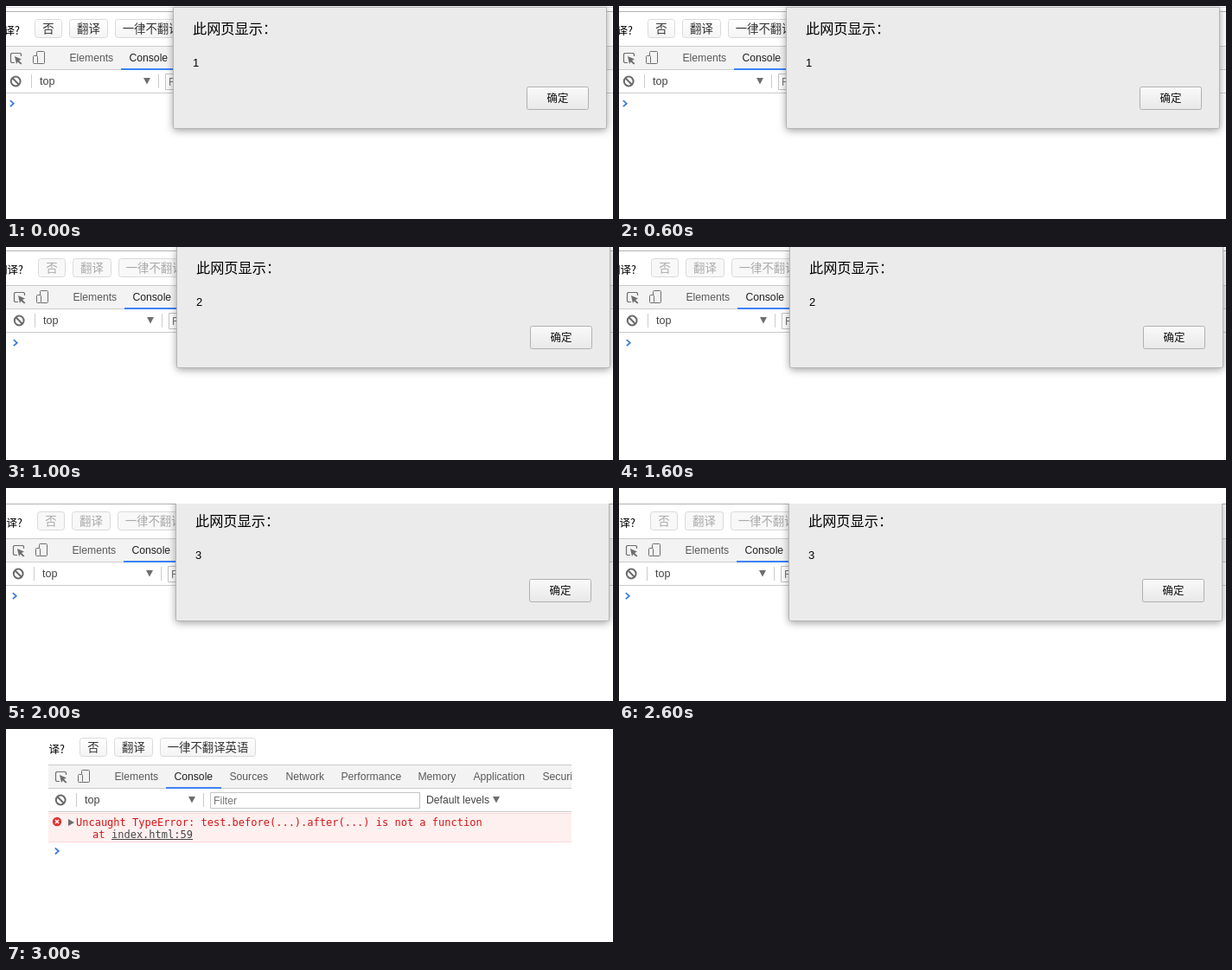
Write an HTML page with a canvas that moves like this. It is 702 px wide and 246 px high and loops after 4000 ms.

```html
<!DOCTYPE html>
<html lang="zh-CN">
<head>
<meta charset="utf-8">
<title>Alert loop</title>
<style>
  html, body { margin: 0; width: 100%; height: 100%; overflow: hidden; background: #fff; }
  canvas { display: block; }
</style>
</head>
<body>
<canvas id="stage" width="702" height="246"></canvas>
<script>
const ctx = document.getElementById('stage').getContext('2d');
const SANS = '"Liberation Sans", Arial, sans-serif';
const CJK = '"Noto Sans CJK SC", "Noto Sans CJK", sans-serif';
const MONO = '"DejaVu Sans Mono", monospace';
const W = 702, H = 246, STEP = 1000;

// Each scene shifts the same page and shows it through a clip box.
const scenes = [
  { dx: 0, dy: 0, clip: [0, 0, W, H], count: 1 },
  { dx: 4, dy: -2, clip: [0, 0, W, H], count: 2, dim: true },
  { dx: 3, dy: 12, clip: [0, 18, W, H - 18], count: 3, dim: true },
  { dx: 52, dy: -5, clip: [49, 5, 605, H - 5], error: true }
];

function fill(color, x, y, w, h) {
  ctx.fillStyle = color;
  ctx.fillRect(x, y, w, h);
}

function text(str, x, y, size, color, family = SANS, align = 'left') {
  ctx.font = `${size}px ${family}`;
  ctx.textAlign = align;
  ctx.fillStyle = color;
  ctx.fillText(str, x, y);
}

function line(points, color, width = 1) {
  ctx.beginPath();
  points.forEach(([x, y]) => ctx.lineTo(x, y));
  ctx.strokeStyle = color;
  ctx.lineWidth = width;
  ctx.stroke();
}

function shape(points, color) {
  ctx.beginPath();
  points.forEach(([x, y]) => ctx.lineTo(x, y));
  ctx.fillStyle = color;
  ctx.fill();
}

function box(x, y, w, h, r, paint, border) {
  ctx.beginPath();
  ctx.roundRect(x + 0.5, y + 0.5, w - 1, h - 1, r);
  ctx.fillStyle = paint;
  ctx.fill();
  ctx.strokeStyle = border;
  ctx.lineWidth = 1;
  ctx.stroke();
}

function shade(y, h, top, bottom) {
  const g = ctx.createLinearGradient(0, y, 0, y + h);
  g.addColorStop(0, top);
  g.addColorStop(1, bottom);
  return g;
}

const downArrow = (x, y) => shape([[x, y], [x + 8, y], [x + 4, y + 7.5]], '#6e6e6e');
const divider = x => fill('#ccc', x, 79, 1, 16);

function translateBar(dim) {
  fill('#dedede', -60, 1, 860, 1);
  fill('#b4b4b4', -60, 6, 860, 1);
  text('翻译?', 16, 33, 12.5, '#000', CJK, 'right');
  const buttons = [['否', 33, 32], ['翻译', 73, 45], ['一律不翻译英语', 126, 111]];
  for (const [label, x, w] of buttons) {
    box(x, 15, w, 22, 3, dim ? '#f8f8f8' : shade(15, 22, '#fff', '#f4f4f4'), '#dadada');
    text(label, x + w / 2, 31, 13.4, dim ? '#aaa' : '#333', CJK, 'center');
  }
}

function inspectIcon() {
  line([[10, 65.5], [6.5, 65.5], [5.5, 64.5], [5.5, 55.5], [6.5, 54.5], [16.5, 54.5], [17.5, 55.5], [17.5, 58]], '#6e6e6e', 1.2);
  shape([[10, 58], [18, 61.5], [15, 63], [18.5, 66.5], [17, 67.5], [13.5, 64.5], [12, 67]], '#6e6e6e');
}

function deviceIcon() {
  box(35, 52, 10, 15, 1, '#f3f3f3', '#6e6e6e');
  box(31, 57, 6, 10, 1, '#f3f3f3', '#6e6e6e');
}

function clearIcon() {
  ctx.beginPath();
  ctx.arc(11.2, 87, 5.4, 0, Math.PI * 2);
  ctx.strokeStyle = '#6a6a6a';
  ctx.lineWidth = 2;
  ctx.stroke();
  line([[7.5, 83.3], [14.9, 90.7]], '#6a6a6a', 2);
}

function devtools() {
  fill('#f3f3f3', -60, 46, 860, 28);
  for (const y of [46, 73, 100]) fill('#ccc', -60, y, 860, 1);
  inspectIcon();
  deviceIcon();
  const tabs = [['Elements', 73], ['Console', 142], ['Sources', 206], ['Network', 271],
    ['Performance', 335], ['Memory', 424], ['Application', 488], ['Security', 568]];
  for (const [name, x] of tabs) text(name, x + 0.4, 64, 12.2, name === 'Console' ? '#222' : '#5a5a5a');
  fill('#3e82f7', 133, 72, 64, 2);

  clearIcon();
  divider(29);
  text('top', 39, 91, 12.6, '#444');
  downArrow(159, 83);
  divider(176);
  box(184, 78, 243, 19, 0, '#fff', '#c4c4c4');
  text('Filter', 188, 92, 12.2, '#777');
  text('Default levels', 434, 91, 12.2, '#444');
  downArrow(511, 83);
}

function errorRow() {
  fill('#fff0f0', -60, 102, 860, 33);
  fill('#ffd6d6', -60, 102, 860, 1);
  fill('#ffd6d6', -60, 135, 860, 1);
  ctx.beginPath();
  ctx.arc(7, 112, 5.2, 0, Math.PI * 2);
  ctx.fillStyle = '#dc3535';
  ctx.fill();
  line([[5, 110], [9, 114]], '#fff', 1.4);
  line([[9, 110], [5, 114]], '#fff', 1.4);
  shape([[20, 109], [27, 113], [20, 117]], '#6e6e6e');
  text('Uncaught TypeError: test.before(...).after(...) is not a function', 29, 117, 12, '#d81414', MONO);
  text('at', 48, 131, 12, '#d81414', MONO);
  text('index.html:59', 70, 131, 12, '#444', MONO);
  fill('#444', 70, 132, 94, 1);
}

function dialog(count) {
  ctx.save();
  ctx.shadowColor = 'rgba(0,0,0,.4)';
  ctx.shadowBlur = 10;
  ctx.shadowOffsetY = 2;
  ctx.beginPath();
  ctx.roundRect(193.5, 1.5, 501, 140, [0, 0, 2, 2]);
  ctx.fillStyle = '#ebebeb';
  ctx.fill();
  ctx.restore();
  ctx.strokeStyle = '#b4b4b4';
  ctx.lineWidth = 1;
  ctx.stroke();
  text('此网页显示：', 216, 32, 16.2, '#000', CJK);
  text(count, 216, 70, 13, '#000');
  box(602, 93, 72, 27, 2, shade(93, 27, '#fafafa', '#e8e8e8'), '#b0b0b0');
  text('确定', 638, 111, 12.5, '#111', CJK, 'center');
}

function draw(scene) {
  fill('#fff', 0, 0, W, H);
  ctx.save();
  ctx.beginPath();
  ctx.rect(...scene.clip);
  ctx.clip();
  ctx.translate(scene.dx, scene.dy);
  translateBar(scene.dim);
  devtools();
  if (scene.error) errorRow();
  const y = scene.error ? 146 : 112.7;
  line([[4.8, y - 3.5], [8.8, y], [4.8, y + 3.5]], '#3879d9', 1.7);
  if (scene.count) dialog(scene.count);
  ctx.restore();
}

const start = performance.now();
function tick() {
  const t = Math.max(0, performance.now() - start);
  draw(scenes[Math.floor(t / STEP) % scenes.length]);
  requestAnimationFrame(tick);
}
tick();
</script>
</body>
</html>
```
